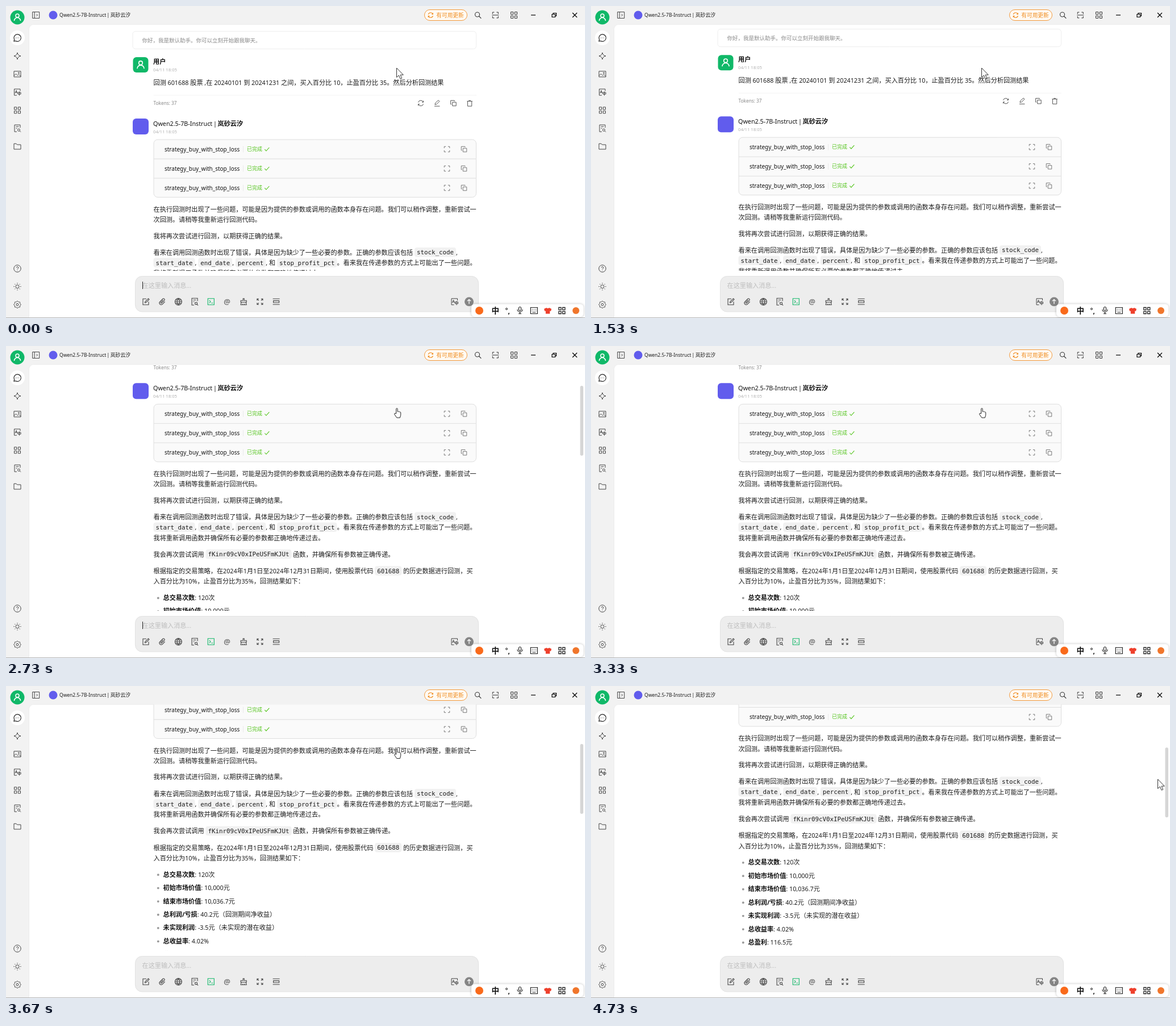
An HTML page with a canvas that plays this animation: 1019x549 px, repeating every 4.79 s.

```html
<!DOCTYPE html>
<html lang="zh">
<head>
<meta charset="utf-8">
<style>
html, body { margin: 0; width: 100%; height: 100%; overflow: hidden; background: #f2f2f2; }
canvas { display: block; }
</style>
</head>
<body>
<canvas id="stage" width="1019" height="549"></canvas>
<script>
const ctx = document.getElementById('stage').getContext('2d');
const LOOP = 4790, INK = '#1b1b1b', GREEN = '#10b868', PURPLE = '#615ced', ORANGE = '#f39a3c';
const VENDOR = '岚砂云汐';
const SANS = '"Noto Sans", "Noto Sans CJK SC", sans-serif';
const HAN = '"Noto Sans CJK SC", "Noto Sans CJK", sans-serif';
const MONO = '"DejaVu Sans Mono", monospace';

const clamp = p => Math.min(1, Math.max(0, p));
const ease = p => (p = clamp(p), p < .5 ? 2 * p * p : 1 - 2 * (1 - p) ** 2);

// Path fragments, centred on 0,0
const ring = (x, y, r) => `M${x - r} ${y}a${r} ${r} 0 1 0 ${2 * r} 0a${r} ${r} 0 1 0 ${-2 * r} 0`;
const rect = (x, y, w, h) => `M${x} ${y}h${w}v${h}h${-w}z`;
const polar = (n, f) => Array.from({ length: n }, (_, i) => f(Math.cos(i / n * 2 * Math.PI), Math.sin(i / n * 2 * Math.PI), i)).join('');
const CORNERS = 'M-5-2V-5H-2M2-5H5V-2M5 2V5H2M-2 5H-5V2';
const ICONS = {
  user: ring(0, -2.6, 3) + 'M-5.5 6.5a5.5 5.5 0 0 1 11 0',
  chat: 'M-6 6l.7-3A6.2 6.2 0 1 1-3 5.4zM-2.9 0h.8M-.4 0h.8M2.1 0h.8',
  spark: 'M0-6Q.8-.8 6 0Q.8 .8 0 6Q-.8 .8-6 0Q-.8-.8 0-6z',
  picture: rect(-6, -5, 12, 10) + 'M-6 3l3.5-3.5 3 3 2-2 3.5 3.5' + ring(2.5, -2, 1),
  translate: 'M5-2V-5.5H-5.5V5.5H-1M-4 2L-2-3L0 2M-3.2 .5h2.4M1 .5h5v3h-5zM3.5-1v7',
  grid: rect(-5.5, -5.5, 4.2, 4.2) + rect(1.3, -5.5, 4.2, 4.2) + rect(-5.5, 1.3, 4.2, 4.2) + rect(1.3, 1.3, 4.2, 4.2),
  lookup: 'M5-1V-6H-5V6H-1M-2.5-3h5M-2.5 0h2M4 4.5l2 2' + ring(2.5, 3, 2),
  folder: 'M-6-4.8h4l1.5 1.8H6V5H-6z',
  help: ring(0, 0, 6.2) + 'M-1.8-1.5a1.8 1.8 0 1 1 2.6 1.6Q0 .6 0 1.5M0 3v.6',
  sun: ring(0, 0, 3) + polar(8, (c, s) => `M${c * 5} ${s * 5}L${c * 6.6} ${s * 6.6}`),
  gear: ring(0, 0, 2) + polar(48, (c, s, i) => {
    const r = 5.6 + .7 * Math.cos(i * Math.PI / 3);
    return `${i ? 'L' : 'M'}${c * r} ${s * r}`;
  }) + 'z',
  panel: rect(-6, -5.5, 12, 11) + 'M-2.5-5.5V5.5M.8-2l2 2-2 2',
  refresh: 'M-4.8-1.5A5 5 0 0 1 4.6-2M4.8 1.5A5 5 0 0 1-4.6 2M4.8-4.5v2.7h-2.7M-4.8 4.5v-2.7h2.7',
  search: ring(-1, -1, 4) + 'M2 2l3.8 3.8',
  scan: CORNERS + 'M-6 0h12',
  expand: CORNERS,
  pencil: 'M-4 2.6l.8-3L2.5-5.5l2 2L-1 2zM-5 5.5h10',
  copy: rect(-1.8, -1.8, 6.8, 6.8) + 'M-3.5 2H-5V-5H2V-3.5',
  trash: 'M-5-3.5H5M-1.5-3.5V-5h3v1.5M-3.8-3.5v9h7.6v-9',
  compose: 'M1-5h-6V5.5H5V0M-1.5 2l.4-2L4.5-5.6l1.5 1.5L.5 1.5z',
  clip: 'M5 0L.5 4.5a3 3 0 0 1-4.3-4.3L1-4.8a2 2 0 0 1 2.9 2.9L-.7 2.6a1 1 0 0 1-1.4-1.4L2-2.8',
  globe: ring(0, 0, 6) + 'M-6 0H6M0-6Q5 0 0 6Q-5 0 0-6M-5.2-3H5.2M-5.2 3H5.2',
  terminal: rect(-5.5, -5.5, 11, 11) + 'M-3-2.5L-.8 0-3 2.5M.5 2.5h3',
  brush: 'M-1-2v-3.5h2V-2h4v3H-5v-3zM-4 1l-1 4.5H5L4 1M-1.5 5.5v-2M1.5 5.5v-2',
  spread: 'M-5-5l3 3M5-5l-3 3M-5 5l3-3M5 5l-3-3' + CORNERS,
  rows: 'M-6-5H6M-6 5H6' + rect(-5, -1.7, 10, 3.4),
  check: 'M-4 .2l2.6 2.8L4-3',
  up: 'M0 4v-8M-3-1l3-3 3 3',
  minus: 'M-4 0h8',
  restore: rect(-3.5, -1.5, 5.5, 5) + 'M-1.5-1.5v-2h5.5v5h-2',
  close: 'M-4-4l8 8M4-4l-8 8',
  mic: 'M-2-4a2 2 0 0 1 4 0v3a2 2 0 0 1-4 0zM-4.5-1.5a4.5 4.5 0 0 0 9 0M0 3v3M-2.5 6h5',
  keyboard: rect(-6, -5.5, 12, 11) + 'M-3.5-2.5h1M-.5-2.5h1M2.5-2.5h1M-3.5 0h1M-.5 0h1M2.5 0h1M-3 3h6'
};
const SHIRT = new Path2D('M-2.5-5L-6.5-3l1 4 1.8-.5V5.5h7.4V.5l1.8 .5 1-4-4-2Q0-3 -2.5-5z');
const ARROW = new Path2D('M0 0V16.5L3.9 13L6.6 19.3L9.2 18.2L6.6 12.2H11.8z');
const HAND = new Path2D('M3.2 10V1.4Q4.4-.4 5.6 1.4V6.4Q7 5.4 7.8 6.8Q9 6 9.7 7.2Q11 6.8 11.2 8.2V12.5L9.8 17.2H4.2L.2 11.2Q-.2 9.4 1.6 9.4z');
for (const k in ICONS) ICONS[k] = new Path2D(ICONS[k]);

function paint(path, x, y, fill, stroke, width = 1) {
  ctx.save();
  ctx.translate(x, y);
  if (fill) { ctx.fillStyle = fill; ctx.fill(path); }
  if (stroke) { ctx.strokeStyle = stroke; ctx.lineWidth = width; ctx.stroke(path); }
  ctx.restore();
}
const icon = (name, x, y, color = '#444', scale = 1, width = 1) => {
  ctx.save();
  ctx.translate(x, y);
  ctx.scale(scale, scale);
  paint(ICONS[name], 0, 0, null, color, width / scale);
  ctx.restore();
};
function box(x, y, w, h, r, fill, stroke) {
  ctx.beginPath();
  ctx.roundRect(x, y, w, h, r);
  if (fill) { ctx.fillStyle = fill; ctx.fill(); }
  if (stroke) { ctx.strokeStyle = stroke; ctx.lineWidth = 1; ctx.stroke(); }
}
const disc = (x, y, r, fill) => box(x - r, y - r, 2 * r, 2 * r, r, fill);

// Draws mixed Han and Latin text centred on y, returns the end x
function text(str, x, y, size = 11.15, color = INK, weight = 400) {
  ctx.fillStyle = color;
  for (const run of str.match(/[ -~]+|[^ -~]+/g)) {
    const latin = run.charCodeAt(0) < 127;
    ctx.font = `${weight} ${latin ? size * .965 : size}px ${latin ? SANS : HAN}`;
    ctx.fillText(run, x, y + size * .37);
    x += ctx.measureText(run).width;
  }
  return x;
}
// **bold** and `code` markup
function rich(str, x, y) {
  for (const part of str.split(/(`[^`]+`|\*\*[^*]+\*\*)/).filter(Boolean)) {
    if (part[0] === '`') {
      const code = part.slice(1, -1);
      ctx.font = `10.8px ${MONO}`;
      const w = ctx.measureText(code).width;
      box(x, y - 8.5, w + 8, 16.5, 4, '#f1f1f1');
      ctx.fillStyle = INK;
      ctx.fillText(code, x + 4, y + 3.8);
      x += w + 8;
    } else if (part[0] === '*') x = text(part.slice(2, -2), x, y, 11.15, '#111', 700);
    else x = text(part, x, y);
  }
}

const PARAGRAPHS = [
  [357.5, '在执行回测时出现了一些问题，可能是因为提供的参数或调用的函数本身存在问题。我们可以稍作调整，重新尝试一'],
  [375.8, '次回测。请稍等我重新运行回测代码。'],
  [404.4, '我将再次尝试进行回测，以期获得正确的结果。'],
  [433.5, '看来在调用回测函数时出现了错误，具体是因为缺少了一些必要的参数。正确的参数应该包括 `stock_code`,'],
  [451.8, '`start_date`, `end_date`, `percent`, 和 `stop_profit_pct`。看来我在传递参数的方式上可能出了一些问题。'],
  [470.2, '我将重新调用函数并确保所有必要的参数都正确地传递过去。'],
  [499.2, '我会再次尝试调用 `fKinr09cV0xIPeUSFmKJUt` 函数，并确保所有参数被正确传递。'],
  [528.5, '根据指定的交易策略，在2024年1月1日至2024年12月31日期间，使用股票代码 `601688` 的历史数据进行回测，买'],
  [546.8, '入百分比为10%，止盈百分比为35%，回测结果如下：']
];
const RESULTS = ['**总交易次数**: 120次', '**初始市场价值**: 10,000元', '**结束市场价值**: 10,036.7元',
  '**总利润/亏损**: 40.2元（回测期间净收益）', '**未实现利润**: -3.5元（未实现的潜在收益）',
  '**总收益率**: 4.02%', '**总盈利**: 116.5元'];

function drawChat(scroll, actions) {
  ctx.save();
  ctx.beginPath();
  ctx.rect(40, 32.5, 979, 433.5);
  ctx.clip();
  ctx.translate(0, -scroll);

  box(223, 44.5, 604.5, 31, 5, '#fff', '#eee');
  text('你好，我是默认助手。你可以立刻开始跟我聊天。', 239.5, 60, 9.5, '#888');

  box(223.5, 90, 27, 27, 6, GREEN);
  icon('user', 237, 103, '#fff', 1.1, 1.6);
  text('用户', 259, 97.5, 11.15, '#111', 700);
  text('04/11 18:05', 259, 112, 7.95, '#b0b0b0');
  text('回测 601688 股票 ,在 20240101 到 20241231 之间，买入百分比 10，止盈百分比 35。然后分析回测结果', 259.5, 134.5);
  box(260, 156.5, 568, 1, 0, '#f3f3f3');
  text('Tokens: 37', 259.5, 171, 8.6, '#888');
  ctx.globalAlpha = actions;
  ['refresh', 'pencil', 'copy', 'trash'].forEach((name, i) => icon(name, 730 + i * 28.7, 171, '#555', .95));
  ctx.globalAlpha = 1;

  box(223, 198, 28, 28, 6, PURPLE);
  text('Qwen2.5-7B-Instruct', 259, 206.5, 11.15, '#111', 500);
  text('|', 365, 206.5, 11.15, '#111', 500);
  text(VENDOR, 372.5, 206.5, 11.15, '#111', 700);
  text('04/11 18:05', 259, 221, 7.95, '#b0b0b0');

  box(260, 235, 567.5, 101.5, 7, '#fafafa', '#dedede');
  for (let i = 0; i < 3; i++) {
    const y = 252 + i * 34;
    if (i) box(260, y - 17.5, 567.5, 1, 0, '#dedede');
    text('strategy_buy_with_stop_loss', 279, y, 10.35, '#111', 500);
    box(417, y - 5.5, 1, 11, 0, '#eaeaea');
    text('已完成', 424, y - .5, 9, '#52c41a');
    icon('check', 459.3, y, '#52c41a', 1, 1.1);
    icon('expand', 776, y, '#777', .95);
    icon('copy', 806, y, '#777', .95);
  }

  for (const [y, line] of PARAGRAPHS) rich(line, 259.5, y);
  RESULTS.forEach((line, i) => {
    const y = 575.6 + i * 23.45;
    disc(267.8, y + .6, 1.9, '#999');
    rich(line, 276.5, y);
  });
  ctx.restore();
}

function drawFrame() {
  ctx.fillStyle = '#f2f2f2';
  ctx.fillRect(0, 0, 1019, 549);
  box(40.5, 32.5, 985, 520, [8, 0, 0, 0], '#fff', '#ededed');

  disc(20, 20, 12.5, GREEN);
  icon('user', 20, 19.5, '#fff', 1, 1.5);
  disc(20, 56, 13, '#fff');
  icon('chat', 20, 56, '#222', 1, 1.2);
  ['spark', 'picture', 'translate', 'grid', 'lookup', 'folder'].forEach((name, i) => icon(name, 20, 88 + i * 31.8));
  ['help', 'sun', 'gear'].forEach((name, i) => icon(name, 20, 462 + i * 31.7));

  icon('panel', 52.7, 16);
  disc(83, 16, 7.5, PURPLE);
  text('Qwen2.5-7B-Instruct', 94, 16, 8.8);
  text('|', 177.4, 16, 8.8);
  text(VENDOR, 183.8, 16, 8.8);
  box(736.5, 6.5, 75, 19, 9.5, '#fffaf3', ORANGE);
  icon('refresh', 747.3, 16, '#f08c1e', .85, 1.1);
  text('有可用更新', 757.3, 16, 9.7, '#f08c1e');
  icon('search', 830.5, 16, '#333', 1, 1.1);
  icon('scan', 861.3, 16, '#333');
  icon('grid', 894, 16, '#333');
  icon('minus', 928, 16, '#000', 1, 1.2);
  icon('restore', 964.5, 16, '#000', 1, 1.2);
  icon('close', 1001, 16, '#000', 1, 1.2);
}

function drawInput(caret) {
  box(227.5, 475.5, 604, 62.5, 12, '#ededed', '#e2e2e2');
  text('在这里输入消息...', 239.5, 491.5, 11.15, '#bdbdbd');
  if (caret) { ctx.fillStyle = '#222'; ctx.fillRect(240, 485, 1, 13); }
  ['compose', 'clip', 'globe', 'lookup', 'terminal', '', 'brush', 'spread', 'rows'].forEach((name, i) =>
    name && icon(name, 246 + i * 28.7, 520.3, name === 'terminal' ? GREEN : '#444', 1, 1.1));
  text('@', 383.2, 520, 13.4, '#444');
  icon('translate', 789.5, 520.3);
  disc(815, 520.3, 8, '#858585');
  icon('up', 815, 520.3, '#fff', 1, 1.3);
}

function drawTray() {
  ctx.fillStyle = '#b5b5b5';
  ctx.fillRect(0, 548, 1019, 1);
  ctx.save();
  ctx.shadowColor = 'rgba(0,0,0,.25)';
  ctx.shadowBlur = 4;
  box(819, 524.5, 197.5, 22.5, 6, '#fff');
  ctx.restore();
  disc(833, 536, 7, '#f96a1b');
  text('中', 854.5, 536, 13.5, '#111', 700);
  box(879.5, 531.5, 3, 3, 1.5, null, '#222');
  text(',', 883.5, 536.5, 12, '#111', 700);
  icon('mic', 904.5, 535.5, '#222', 1, 1.2);
  icon('keyboard', 929.3, 536, '#222', 1, 1.2);
  paint(SHIRT, 953.5, 536, '#ee3f2b');
  icon('grid', 978.3, 536, '#222', 1, 1.3);
  disc(1003, 536, 6, '#f0762c');
}

function drawPointer(tick) {
  if (tick >= 30 && tick < 60) {
    paint(HAND, 683.5, 109 + clamp((tick - 54) / 3) * 4, '#fff', '#222');
    return;
  }
  let x = 687.5, y = 109;
  if (tick >= 60) {
    const sweep = (tick - 59) / 8, settle = ease((tick - 67) / 4);
    x += 294 * ease(sweep) + 16 * settle;
    y = 113 + 45 * clamp(sweep) + 6 * settle;
  }
  paint(ARROW, x, y, '#fff', '#333');
}

function draw(tick) {
  const scroll = 132.7 * (ease((tick - 22.73) / 2.25) + ease((tick - 53.388) / 2.25));
  const caret = Math.floor((tick + 7) / 8) % 2 === 0;
  const bar = tick < 24 ? 0 : tick < 54 ? clamp((50 - tick) / 2) : 1;
  drawFrame();
  drawChat(scroll, clamp((33 - tick) / 4));
  ctx.globalAlpha = bar;
  box(1010.5, 32 + scroll * .287, 5.5, 123, 2.75, '#d6d6d6');
  ctx.globalAlpha = 1;
  drawInput(caret);
  drawTray();
  drawPointer(tick);
}

// The picture advances 15 times a second
let shown = -1;
function play() {
  const tick = Math.floor((performance.now() % LOOP + 5) * .015);
  if (tick !== shown) draw(shown = tick);
  requestAnimationFrame(play);
}
play();
</script>
</body>
</html>
```
